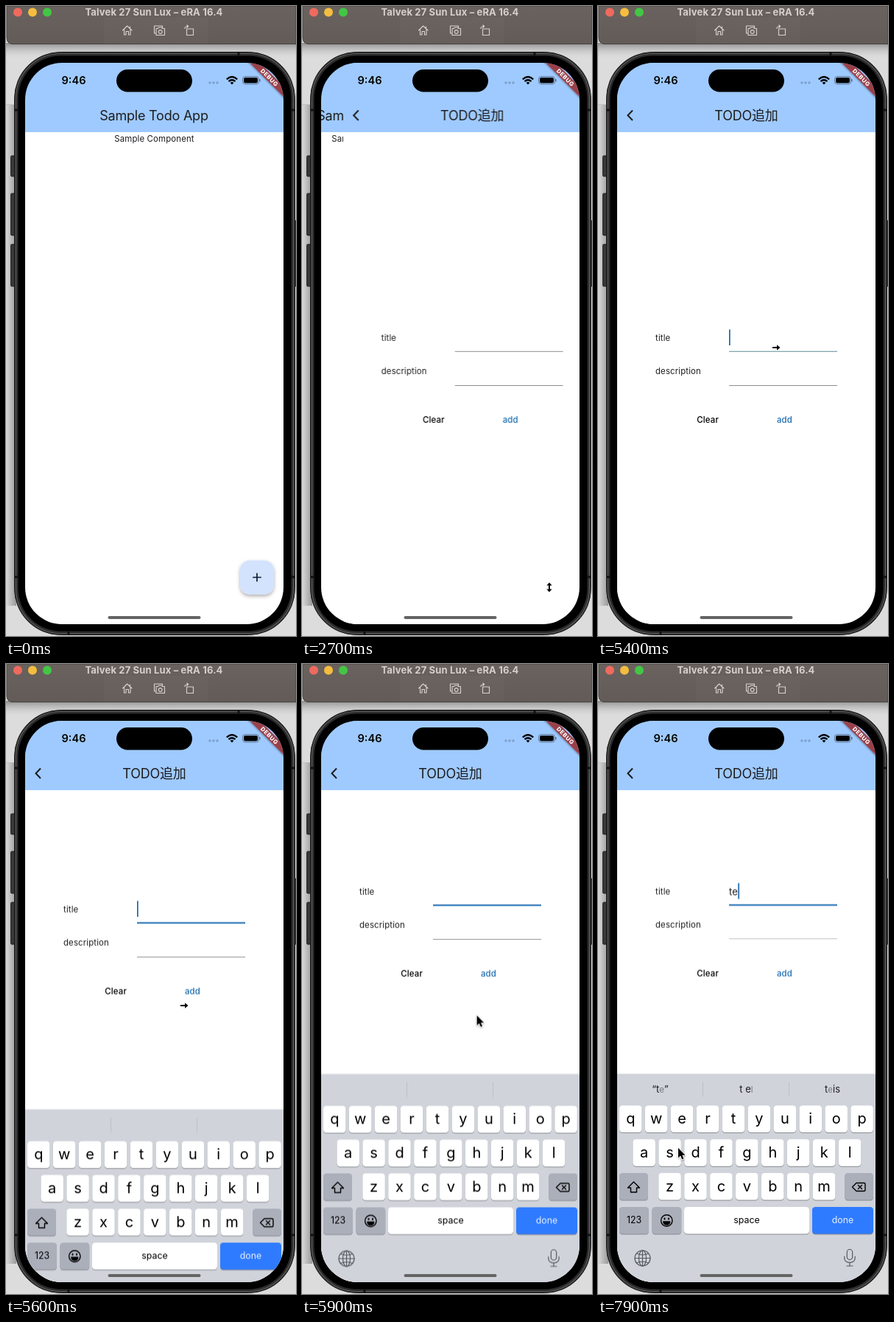
An HTML page that plays this animation: 394x854 px, repeating every 8000 ms.

```html
<!DOCTYPE html>
<html lang="en">
<head>
<meta charset="utf-8">
<title>Todo app</title>
<style>
html, body { margin: 0; width: 100%; height: 100%; overflow: hidden; background: #dcdcdc; }
svg { display: block; width: 394px; height: 854px; }
text { font: 400 11.4px Inter, "Noto Sans CJK JP", "Noto Sans CJK", sans-serif; letter-spacing: .15px; fill: #1d1d20; white-space: pre; }
.mid { text-anchor: middle; }
.head { font-size: 18px; letter-spacing: -.22px; }
.btn { font-weight: 500; fill: #000; }
.key { font-size: 20px; letter-spacing: 0; fill: #000; }
.small { font-size: 12.4px; letter-spacing: 0; fill: #000; }
.word { font-size: 13px; letter-spacing: 0; }
.line { fill: none; stroke-linecap: round; stroke-linejoin: round; }
.cursor path { fill: #000; stroke: #fff; stroke-width: 1.6px; paint-order: stroke; stroke-linejoin: round; }
</style>
</head>
<body>
<svg viewBox="0 0 394 854">
  <defs>
    <clipPath id="screen"><rect x="26" y="77" width="351" height="761" rx="50"/></clipPath>
    <linearGradient id="side"><stop offset="0" stop-color="#dadada"/><stop offset="1" stop-color="#999"/></linearGradient>
    <linearGradient id="under" x2="0" y2="1"><stop offset="0" stop-color="#8d8d8d"/><stop offset="1" stop-color="#ddd" stop-opacity="0"/></linearGradient>
    <linearGradient id="bar" x2="0" y2="1"><stop offset="0" stop-color="#6a625e"/><stop offset="1" stop-color="#625b57"/></linearGradient>
    <filter id="soft" x="-40%" y="-40%" width="180%" height="180%"><feDropShadow dx="0" dy="2.5" stdDeviation="2.6" flood-opacity=".32"/></filter>
    <filter id="lift" x="-60%" y="-60%" width="220%" height="220%"><feDropShadow dx="0" dy="1" stdDeviation="1" flood-opacity=".35"/></filter>
  </defs>

  <!-- desktop and window bar -->
  <rect width="394" height="854" fill="#dcdcdc"/>
  <rect y="133" width="14" height="680" fill="url(#side)"/>
  <path d="M0 133.5H11" stroke="#c4c4c4"/>
  <rect y="50" width="394" height="22" fill="url(#under)"/>
  <path d="M1 0H394V51.500H9Q1 51.500 1 43Z" fill="url(#bar)" stroke="#48423f"/>
  <rect x="133" y="16" width="142" height="35" fill="#fff" opacity=".02"/>
  <circle cx="16" cy="8.500" r="6" fill="#ee6a5f"/>
  <circle cx="36" cy="8.500" r="6" fill="#f5bd3f"/>
  <circle cx="56" cy="8.500" r="6" fill="#43c645"/>
  <text class="mid" x="201" y="13" style="font-size:13px;font-weight:700;fill:#d5d0cd">Talvek 27 Sun Lux – eRA 16.4</text>
  <g class="line" stroke="#d8d4d1" stroke-width="1.1">
    <path d="M158.500 33L164.700 27L171 33M160.500 32V39H163V34.500H166.500V39H169V32M168.500 30V28"/>
    <path d="M203.500 37H201.500V27H212.500V29M204 30.500H206.500L207.500 29H211.500L212.500 30.500H215.500V39.500H204Z"/>
    <circle cx="209.700" cy="35" r="2.400"/>
    <path d="M245.500 31H254.500V39.500H245.500ZM243 30.500Q243 27.500 247.500 27.500M245.800 25.800L247.700 27.500L245.800 29.300"/>
  </g>

  <!-- handset -->
  <g fill="#383838" stroke="#111" stroke-width=".8">
    <rect x="6.500" y="203" width="6" height="28" rx="1.500"/>
    <rect x="6.500" y="254" width="6" height="57" rx="1.500"/>
    <rect x="6.500" y="323" width="6" height="57" rx="1.500"/>
    <rect x="390" y="291" width="5" height="89" rx="1.500"/>
  </g>
  <rect x="11.500" y="62.500" width="381" height="790" rx="63" fill="#2b2b2b" stroke="#1b1b1b"/>
  <rect x="13.500" y="64.500" width="377" height="786" rx="61" fill="none" stroke="#5b5b5b" stroke-width="1.200"/>
  <rect x="16.500" y="67.500" width="371" height="780" rx="58" fill="#000"/>
  <path d="M316 62.500V67M85 848V852.500M11.500 141H16M11.500 774H16M388 141H392.500M388 774H392.500" stroke="#111" stroke-width="3"/>

  <g clip-path="url(#screen)">
    <g id="home">
      <rect x="26" y="77" width="351" height="761" fill="#fff"/>
      <rect x="26" y="77" width="351" height="94" fill="#9fcaff"/>
      <text class="mid head" x="201" y="154.500">Sample Todo App</text>
      <text class="mid" x="201.500" y="183.500">Sample Component</text>
      <rect x="318" y="751.500" width="46" height="46" rx="13" fill="#d3e3fd" filter="url(#soft)"/>
      <rect id="press" x="318" y="751.500" width="46" height="46" rx="13" fill="#001c38" fill-opacity=".1"/>
      <path d="M335.200 774.500H346.800M341 768.700V780.300" stroke="#0a1d36" stroke-width="1.700"/>
    </g>

    <g id="form">
      <rect x="26" y="77" width="351" height="761" fill="#fff"/>
      <rect x="26" y="77" width="351" height="94" fill="#9fcaff"/>
      <path class="line" d="M47 141.500L40.500 148.300L47 155" stroke="#1d1d20" stroke-width="2" style="stroke-linecap:butt;stroke-linejoin:miter"/>
      <text class="mid head" x="201.500" y="154.500">TODO追加</text>
      <g id="fields">
        <text x="78" y="453.500">title</text>
        <text x="78" y="499">description</text>
        <path id="rule" d="M178 468.300H325" stroke="#8f8f8f"/>
        <path d="M178 514.500H325" stroke="#8f8f8f"/>
        <text id="typed1" class="word" x="178" y="455">t</text>
        <text id="typed2" class="word" x="178" y="455">te</text>
        <rect id="caret" x="178" y="438.500" width="1.700" height="21.500" fill="#1b66aa"/>
        <text class="btn" x="134.300" y="564.500">Clear</text>
        <text class="btn" x="243" y="564.500" style="fill:#1b6cb0">add</text>
      </g>
    </g>

    <!-- status bar -->
    <text class="mid" x="92" y="106" style="font-size:14.6px;font-weight:600;letter-spacing:0;fill:#000">9:46</text>
    <rect x="150" y="86" width="103" height="30.500" rx="15.200" fill="#000"/>
    <path class="line" d="M277 104H292" stroke="#7f9fc9" stroke-width="3.400" stroke-dasharray="0 5"/>
    <g class="line" stroke="#000" stroke-width="2.300" style="stroke-linecap:butt">
      <path d="M299.800 99.300Q307 92.800 314.200 99.300M302.500 102.200Q307 98.200 311.500 102.200"/>
      <path d="M307 106.500L304.600 104Q307 102.200 309.400 104Z" fill="#000" stroke="none"/>
    </g>
    <rect x="321.500" y="95.500" width="22" height="10.500" rx="3.500" fill="none" stroke="#000" stroke-opacity=".4"/>
    <rect x="323" y="97" width="19" height="7.500" rx="2.200" fill="#000"/>
    <path d="M345 99V102.500" stroke="#000" stroke-opacity=".45" stroke-width="1.300"/>
    <g transform="translate(358 97) rotate(45)">
      <rect x="-45" y="-4.900" width="90" height="9.800" fill="#9a3f48" filter="url(#lift)"/>
      <text class="mid" y="2.900" style="font-size:7.800px;font-weight:800;letter-spacing:.6px;fill:#fff">DEBUG</text>
    </g>

    <g id="board">
      <rect x="26" y="555.500" width="351" height="290" fill="#d0d3da"/>
      <path d="M142.500 566.500V586.500M259.500 566.500V586.500" stroke="#bcc0c7"/>
      <g id="keys"></g>
      <g class="line" stroke="#000" stroke-width="1.400">
        <path d="M48.500 702L56.500 710H52.500V716H44.500V710H40.500Z"/>
        <path d="M351 703.500H361.500Q363 703.500 363 705V713Q363 714.500 361.500 714.500H351L345.500 709ZM353.500 706.500L358.500 711.500M358.500 706.500L353.500 711.500"/>
        <circle cx="93.300" cy="754.500" r="7.700"/>
        <path d="M88.800 756H97.800Q97 760 93.300 760T88.800 756Z" fill="#000"/>
        <path d="M90.500 751.500V752.500M96 751.500V752.500" stroke-width="2"/>
      </g>
      <g class="line" stroke="#565a61" stroke-width="1.200">
        <circle cx="60.500" cy="805.500" r="10.500"/>
        <ellipse cx="60.500" cy="805.500" rx="5" ry="10.500"/>
        <path d="M60.500 795V816M50 805.500H71M52.500 799Q60.500 803 68.500 799M52.500 812Q60.500 808 68.500 812"/>
        <rect x="338.300" y="793.500" width="7.400" height="14" rx="3.700"/>
        <path d="M334.800 803V805Q335 811.300 342 811.300T349.200 805V803M342 811.500V816M338 816H346"/>
      </g>
      <g id="hints"></g>
      <g id="pops"></g>
    </g>
    <rect x="138.500" y="827" width="126" height="4" rx="2" fill="#646464"/>
  </g>

  <g id="pointer" class="cursor">
    <circle id="ring" r="15" fill="#fff" stroke="#000" stroke-width="3"/>
    <path id="arrow" filter="url(#lift)" d="M0 0V13.500L3.100 10.600L5.200 15.400L7.400 14.400L5.300 9.800H9.500Z"/>
    <path id="tall" d="M0-6.500L3.600-2.500H1V2.500H3.600L0 6.500L-3.600 2.500H-1V-2.500H-3.600Z"/>
    <path id="wide" transform="rotate(90)" d="M0-6.500L3.600-2.500H1V2.500H3.600L0 6.500L-3.600 2.500H-1V-2.500H-3.600Z"/>
    <path id="right" d="M-5-1H1V-3.800L5.500 0L1 3.800V1H-5Z"/>
  </g>
</svg>

<script>
const LOOP = 8000;
const $ = id => document.getElementById(id);

function add(parent, tag, attrs, text = '') {
  const el = document.createElementNS('http://www.w3.org/2000/svg', tag);
  for (const k in attrs) el.setAttribute(k, attrs[k]);
  el.textContent = text;
  return parent.appendChild(el);
}

// rows: [ms, value, easing to the next row]
function track(el, prop, rows) {
  const all = [[0, rows[0][1]], ...rows, [LOOP, rows[rows.length - 1][1]]];
  el.animate(all.map(([ms, value, easing = 'linear']) =>
    ({ offset: ms / LOOP, [prop]: value, easing })), { duration: LOOP, iterations: Infinity });
}

function show(el, ...spans) {
  track(el, 'opacity', [[0, 0], ...spans.flatMap(([a, b]) => [[a, 0], [a, 1], [b, 1], [b, 0]])]);
}

const move = (x, y) => `translate(${x}px, ${y}px)`;

// keyboard
const keys = $('keys');
function cap(x, y, w, label, fill = '#fff', kind = 'key', ink = '#000') {
  add(keys, 'rect', { x, y: y + 1, width: w, height: 36.5, rx: 4.2, fill: '#898c92' });
  add(keys, 'rect', { x, y, width: w, height: 36.5, rx: 4.2, fill });
  const drop = kind === 'key' ? 24.5 : 22;
  add(keys, 'text', { class: 'mid ' + kind, x: x + w / 2, y: y + drop, style: 'fill:' + ink }, label);
}
const PITCH = 34.93, GREY = '#abafba';
[['qwertyuiop', 29], ['asdfghjkl', 47.4], ['zxcvbnm', 82.3]].forEach(([row, x], r) =>
  [...row].forEach((c, i) => cap(x + i * PITCH, 598.5 + r * 45.8, 30.5, c)));
cap(29, 690, 39, '', GREY);
cap(335.3, 690, 38.7, '', GREY);
cap(29, 736, 40, '123', GREY, 'small');
cap(73.5, 736, 39.7, '', GREY);
cap(117, 736, 170, 'space', '#fff', 'small');
cap(291, 736, 83, 'done', '#2f7bff', 'small', '#e6efff');

function hints(words, ...span) {
  const g = add($('hints'), 'g', {});
  words.forEach((word, i) => {
    const t = add(g, 'text', { class: 'mid word', x: 84.5 + i * 117, y: 581 });
    [].concat(word).forEach((part, j) =>
      add(t, 'tspan', j % 2 ? { style: 'fill:#777a80;font-size:11.5px' } : {}, part));
  });
  show(g, span);
}
hints(['I', 'the', 'I’m'], 0, 6900);
hints(['“t”', 'the', 'this'], 6900, 7820);
hints([['“t', 'e', '”'], ['t e', 'l'], ['t', 'e', 'is']], 7820, LOOP);

function pop(letter, x, ...span) {
  const g = add($('pops'), 'g', { transform: `translate(${x} 0)` });
  add(g, 'path', { fill: '#fff', filter: 'url(#lift)', d: 'M-25 556Q-25 547-16 547H16Q25 547 25 556V584C25 594 15.3 594 15.3 604V631Q15.3 635 11.3 635H-11.3Q-15.3 635-15.3 631V604C-15.3 594-25 594-25 584Z' });
  add(g, 'text', { class: 'mid key', y: 582, style: 'font-size:30px' }, letter);
  show(g, span);
}
pop('t', 184, 6690, 6890);
pop('e', 114.1, 7560, 7740);

// page push
const PUSH = 'cubic-bezier(.35,.91,.33,.97)';
track($('home'), 'transform', [[2480, move(0, 0), PUSH], [2930, move(-117, 0)]]);
track($('form'), 'transform', [[2480, move(351, 0), PUSH], [2930, move(0, 0)]]);
show($('press'), [2340, 2600]);

// keyboard rise on a critically damped spring; the form moves up half as far
const rise = Array.from({ length: 21 }, (_, i) => {
  const ms = i * 28, k = ms * .0183;
  return [5425 + ms, 283 * (i < 20 ? (1 + k) * Math.exp(-k) : 0)];
});
track($('board'), 'transform', rise.map(([ms, y]) => [ms, move(0, y)]));
track($('fields'), 'transform', rise.map(([ms, y]) => [ms, move(0, (y - 283) / 2)]));

// focus and typing
track($('rule'), 'stroke', [[5350, '#8f8f8f'], [5400, '#5d8a96'], [5550, '#1b6cb0']]);
track($('rule'), 'strokeWidth', [[5380, '1px'], [5550, '2px']]);
show($('caret'), [5350, 5850], [6350, 7380], [7740, LOOP]);
track($('caret'), 'transform', [[6880, move(0, 0), 'step-end'], [6881, move(4.6, 0), 'step-end'], [7740, move(12.2, 0)]]);
show($('typed1'), [6880, 7740]);
show($('typed2'), [7740, LOOP]);

// pointer
const path = [
  [250, 293, 650], [1350, 336, 788], [3100, 336, 788], [3390, 241, 727], [3850, 241, 727],
  [4700, 242, 463], [5750, 242, 463], [6500, 189, 625], [6950, 189, 625],
  [7450, 115, 622], [7720, 115, 622], [7890, 109, 656]
];
track($('pointer'), 'transform', path.map(([ms, x, y]) => [ms, move(x, y), 'ease-in-out']));
show($('arrow'), [0, 1300], [3100, 4550], [5850, 6400], [7050, LOOP]);
show($('tall'), [1300, 3100]);
show($('right'), [4550, 5850]);
show($('wide'), [6400, 7050]);
show($('ring'), [2340, 2480], [5180, 5320], [6690, 6890], [7560, 7720]);
</script>
</body>
</html>
```
